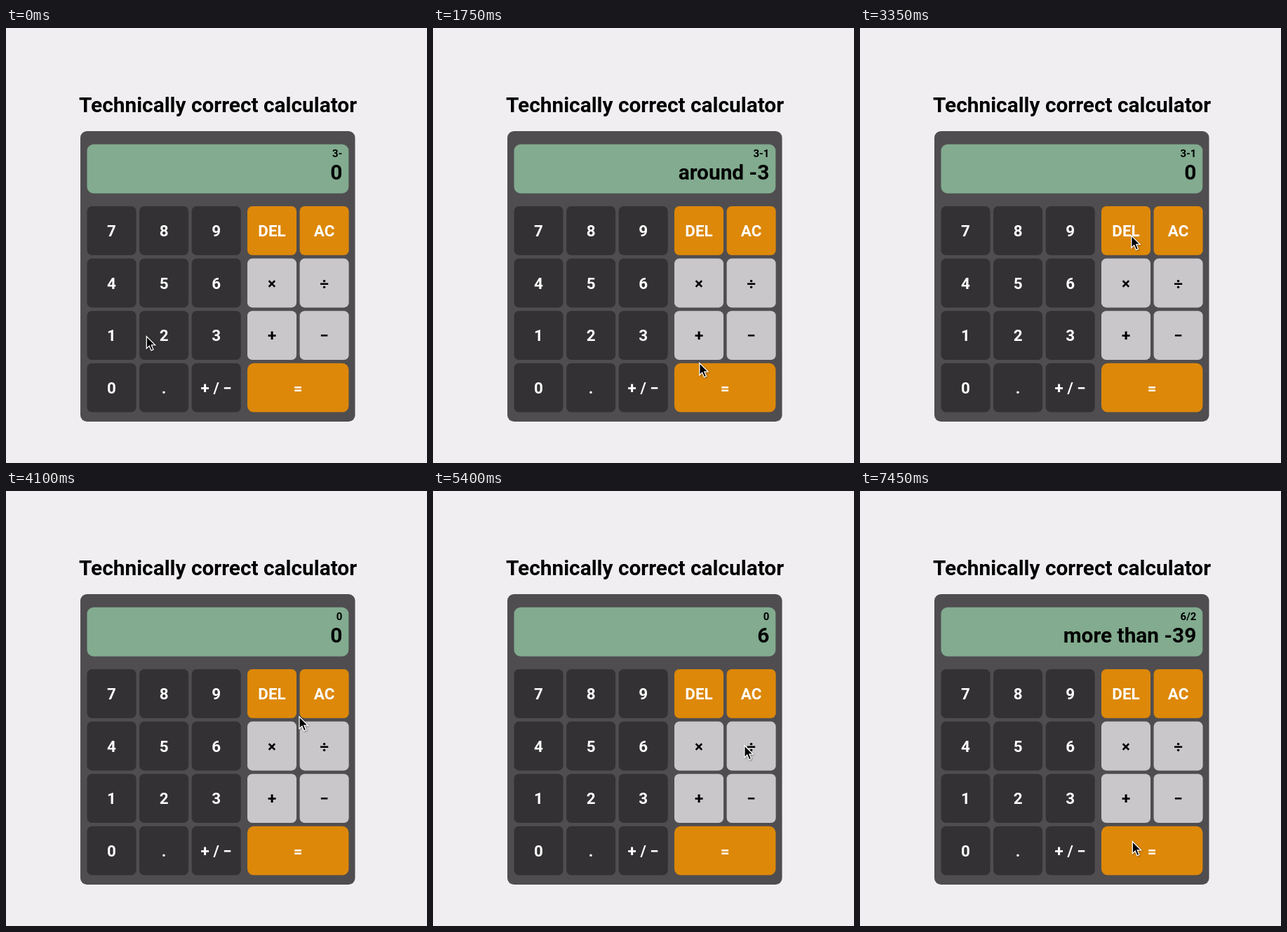
These frames come from a looping animation (600 by 620 pixels, 8 s). An HTML page:

```html
<!DOCTYPE html>
<html lang="en">
<head>
<meta charset="utf-8">
<title>Technically correct calculator</title>
<style>
  html, body { margin: 0; width: 100%; height: 100%; overflow: hidden; background: #f0eef1; }
  svg { display: block; font: bold 22.4px Roboto, sans-serif; text-anchor: middle; }
  .big { font-size: 29.84px; }
  .small { font-size: 14.92px; }
  .right { text-anchor: end; }
  #cursor { stroke: #fff; stroke-width: 1.3; filter: drop-shadow(1px 1px 1px rgba(0, 0, 0, .35)); }
</style>
</head>
<body>
<svg width="600" height="620" viewBox="0 0 600 620">
  <text class="big" x="302" y="120">Technically correct calculator</text>
  <rect x="106" y="147" width="391.5" height="414" rx="9.3" fill="#4f4d50"/>
  <rect x="115.5" y="165.7" width="372.8" height="70" rx="9.3" fill="#82ab8f"/>
  <text id="expression" class="small right" x="479.3" y="184"/>
  <text id="value" class="big right" x="479.3" y="216"/>
  <g id="keys"/>
  <path id="cursor" d="M.3 1V18.2L4.2 14.5L7 21.2L10 20L7.3 13.4H12.6Z"/>
</svg>
<script>
const LOOP = 8000, STEP = 50, PITCH = 74.6;
const $ = id => document.getElementById(id);

const DARK = ["#333133", "#fff"], ORANGE = ["#dd8808", "#fff"], GREY = ["#cac7ca", "#000"];
const keyRows = ["7 8 9 DEL AC", "4 5 6 × ÷", "1 2 3 + −", "0 . +/− ="];

function keyMarkup(label, col, row) {
  const [fill, ink] = col < 3 ? DARK : row % 3 ? GREY : ORANGE;
  const wide = label === "=";
  const width = wide ? 144.4 : 70;
  const x = 115.5 + col * PITCH + (col > 2 ? 4.7 : 0);
  const y = 254 + row * PITCH;
  return `<rect x="${x}" y="${y}" width="${width}" height="69.8" rx="${wide ? 9 : 7}" fill="${fill}"/>
    <text x="${x + width / 2}" y="${Math.round(y + 43.2)}" fill="${ink}">${label.replace("/", " / ")}</text>`;
}
$("keys").innerHTML = keyRows
  .flatMap((row, r) => row.split(" ").map((label, c) => keyMarkup(label, c, r)))
  .join("");

// The calculator never lies, it is only vague.
const answers = { "3-1": "around -3", "6/2": "more than -39" };

function press({ expression, value }, key) {
  switch (key) {
    case "=": return { expression: expression + value, value: answers[expression + value] };
    case "÷": return { expression: value + "/", value: "0" };
    case "DEL": return { expression, value: "0" };
    case "AC": return { expression: "0", value: "0" };
    default: return { expression, value: key };
  }
}

const presses = [
  [450, "1"], [1000, "="], [3350, "DEL"], [4000, "AC"],
  [5150, "6"], [6350, "÷"], [6800, "2"], [7350, "="]
];

// Pointer glides: start, duration, and the point reached
const home = [200, 438.5];
const glides = [
  [0, 250, 152, 436], [450, 400, 404, 517], [1350, 150, 379.5, 476.5],
  [2700, 300, 386.5, 295], [3600, 150, 463, 303], [4000, 300, 288, 371],
  [5150, 300, 456, 361], [6300, 50, 240, 452], [6800, 150, 388, 498.5]
];

const ease = p => p * p * (3 - 2 * p);

function pointerAt(t) {
  return glides.reduce(([x, y], [start, duration, toX, toY]) => {
    const p = ease(Math.min(1, Math.max(0, (t - start) / duration)));
    return [x + (toX - x) * p, y + (toY - y) * p];
  }, home);
}

function draw(now) {
  const t = Math.floor(now % LOOP / STEP) * STEP;
  const { expression, value } = presses
    .filter(([at]) => at <= t)
    .reduce((state, [, key]) => press(state, key), { expression: "3-", value: "0" });
  $("expression").textContent = expression;
  $("value").textContent = value;
  $("cursor").setAttribute("transform", `translate(${pointerAt(t)})`);
}

const began = performance.now();
function tick() {
  draw(performance.now() - began);
  requestAnimationFrame(tick);
}
tick();
</script>
</body>
</html>
```
